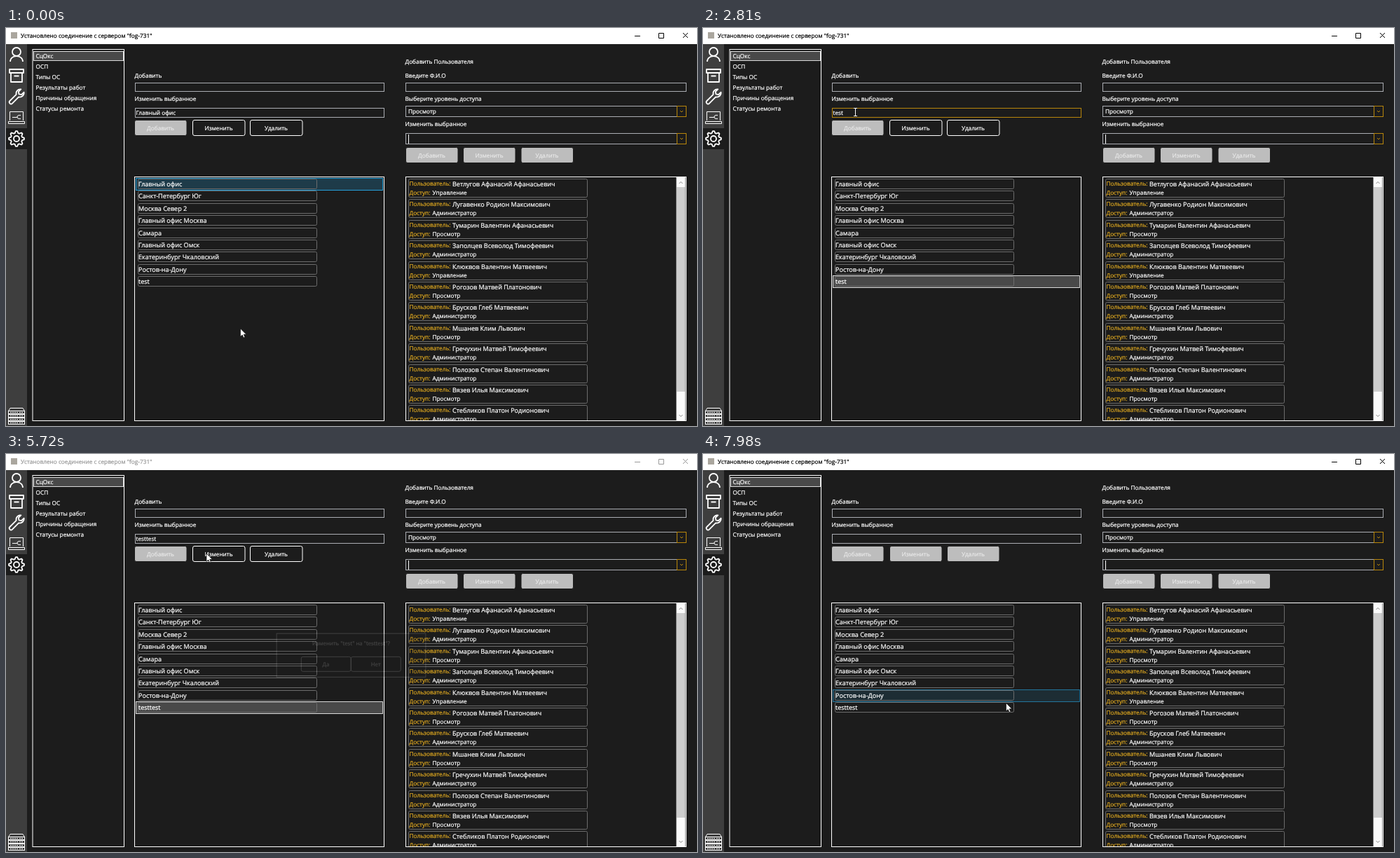
Write an HTML page that moves like this. It is 986 by 568 pixels and loops after 8 s.

```html
<!DOCTYPE html>
<html lang="ru">
<head>
<meta charset="utf-8">
<title>Справочники</title>
<style>
html, body { margin: 0; width: 100%; height: 100%; overflow: hidden; background: #1c1c1c; }
svg { display: block; color: #fff; }
text { font: 8.25px "Open Sans", "Noto Sans", sans-serif; fill: currentColor; stroke: currentColor; stroke-width: .22px;
  text-rendering: geometricPrecision; white-space: pre; }
text.big { font-size: 9.05px; }
text.mid { text-anchor: middle; }
text.gold { color: #daa520; }
.line { fill: none; stroke: #fff; }
.icon { fill: none; stroke: #fff; stroke-width: 1.8; stroke-linejoin: round; }
.box { fill: none; stroke: #abadb3; }
.card { fill: none; stroke: #6c6c6c; }
.accent { fill: none; stroke: #b8860b; }
.row { fill: none; stroke: none; }
.row.sel { fill: #26a0da3d; stroke: #26a0da; }
.row.hover { fill: #26a0da1f; stroke: #26a0daa8; }
.row.idle { fill: #dadada3d; stroke: #dadada; }
.on rect { fill: #b8860b; stroke: #fff; }
.off rect { fill: #bdbdbd; stroke: #1c1c1c; }
.off text { color: #e8e8e8; }
</style>
</head>
<body>
<script>
const rect = (x, y, w, h, attrs = '') => `<rect x="${x}" y="${y}" width="${w}" height="${h}" ${attrs}/>`;
const path = (d, attrs = 'class="icon"') => `<path d="${d}" ${attrs}/>`;
// y is the middle of the capitals
const text = (x, y, s, cls = '', id = '') => `<text x="${x}" y="${y + 3}" class="${cls}" id="${id}">${s}</text>`;
const button = (x, y, s, state, id = '') =>
  `<g class="${state}" id="${id}">${rect(x, y, 74.5, 22, 'rx="2.5"')}${text(x + 37, y + 11.5, s, 'mid')}</g>`;
const combo = (y, h) => rect(570.5, y, 400, h, 'class="box"') +
  rect(957.5, y, 13, h, 'class="accent"') + path(`M962 ${y + h / 2 - 1}l2 2l2 -2`, 'class="accent"');

const menu = ['СцОкс', 'ОСП', 'Типы ОС', 'Результаты работ', 'Причины обращения', 'Статусы ремонта'];
const offices = ['Главный офис', 'Санкт-Петербург Юг', 'Москва Север 2', 'Главный офис Москва', 'Самара',
  'Главный офис Омск', 'Екатеринбург Чкаловский', 'Ростов-на-Дону', 'test'];
const roles = { a: 'Администратор', e: 'Управление', v: 'Просмотр' };
const users = [
  ['Ветлугов Афанасий Афанасьевич', 'e'], ['Лугавенко Родион Максимович', 'a'],
  ['Тумарин Валентин Афанасьевич', 'v'], ['Заполцев Всеволод Тимофеевич', 'a'],
  ['Клюквов Валентин Матвеевич', 'e'], ['Рогозов Матвей Платонович', 'v'],
  ['Брусков Глеб Матвеевич', 'a'], ['Мшанев Клим Львович', 'v'],
  ['Гречухин Матвей Тимофеевич', 'a'], ['Полозов Степан Валентинович', 'a'],
  ['Вязев Илья Максимович', 'v'], ['Стебликов Платон Родионович', 'a']];
const ROW = 17.45, TOP = 213.7;

function titleBar() {
  return rect(0, 0, 986, 23, 'fill="#fff"') + rect(7, 6, 9, 9, 'fill="#aaa69e"') +
    '<g id="title">' + text(21, 11, 'Установлено соединение с сервером "fog-731"') +
    path('M897 11.5h8M931.5 7.5h7v7h-7zM966 7l7 7M973 7l-7 7', 'fill="none" stroke="currentColor"') + '</g>';
}

function sideBar() {
  const gear = Array.from({ length: 32 }, (_, i) => {
    const r = i % 4 < 2 ? 11 : 8.3, a = (i - 0.5) * Math.PI / 16;
    return [15 + r * Math.cos(a), 158 + r * Math.sin(a)].map(v => v.toFixed(1));
  }).join('L');
  let s = rect(0, 23, 30, 545, 'fill="#3e3e3e"') + rect(0, 143, 30, 30, 'fill="#1c1c1c"');
  s += path('M15 28a6 6 0 0 1 0 12a6 6 0 0 1 0 -12M6 48C6 37.5 24 37.5 24 48');
  s += path('M5 59h20v5H5zM7 64v13h16V64M11.5 68.5h7');
  s += '<g transform="translate(15 98) rotate(45)">' +
    path('M-2.5 -2V11a2.5 2.5 0 0 0 5 0V-2A6 6 0 0 0 3 -12V-7L0 -5L-3 -7V-12A6 6 0 0 0 -2.5 -2Z') + '</g>';
  s += path('M5.5 132V119.5h19V132M3.5 133.5h23v3h-23zM9 127.5h7M21 124.5h-3l-2 1.5v2l2 1.5h3', 'class="line"');
  s += path(`M${gear}Z`) + '<circle cx="15" cy="158" r="4" class="icon"/>';
  s += path('M3.5 546.5L6 542.5H24L26.5 546.5', 'class="line"');
  for (let y = 546.5; y < 565; y += 5)
    s += rect(3.5, y, 23, 4, 'class="line"') + path(`M6 ${y + 2}h11M19 ${y + 2}h5`, 'class="line" stroke-dasharray="2 1"');
  return s;
}

function officePanel() {
  let s = text(183.5, 68, 'Добавить') + rect(184.5, 78.5, 355, 12, 'class="box"') +
    text(183.5, 101, 'Изменить выбранное') + rect(184.5, 114.5, 355, 13, 'id="field"') +
    text(185.5, 121, '', '', 'value') + rect(0, 115, 1, 12, 'id="caret" fill="#fff"') +
    button(183.5, 131.5, 'Добавить', 'off') + button(266.5, 131.5, 'Изменить', 'on', 'change') +
    button(348.5, 131.5, 'Удалить', 'on', 'remove') + rect(183.5, 212.5, 356, 348, 'class="line"');
  offices.forEach((name, i) => {
    const y = Math.round(TOP + i * ROW);
    s += rect(185.5, y + 0.5, 352, 17, `class="row" id="row${i}"`) +
      rect(188.5, y + 1.5, 255, 14, 'rx="2" class="card"') + text(189, y + 9, name, 'big', 'name' + i);
  });
  return s;
}

function userPanel() {
  let s = text(569.5, 48, 'Добавить Пользователя') + text(569.5, 68, 'Введите Ф.И.О') +
    rect(570.5, 78.5, 400, 12, 'class="box"') + text(569.5, 101, 'Выберите уровень доступа') +
    combo(111.5, 15) + text(574, 119, 'Просмотр') + text(569.5, 137, 'Изменить выбранное') +
    combo(150.5, 15) + path('M574.5 152v13', 'class="line"');
  [[570.5, 'Добавить'], [652.5, 'Изменить'], [735, 'Удалить']].forEach(([x, name]) => s += button(x, 170.5, name, 'off'));
  s += '<svg y="213" width="986" height="347" viewBox="0 213 986 347">';
  users.forEach(([name, role], i) => {
    const y = Math.round(215 + i * 29.4);
    s += rect(574.5, y + 0.5, 255, 26, 'rx="2" class="card"') +
      text(575.5, y + 7, 'Пользователь:', 'gold') + text(637, y + 8, name, 'big') +
      text(575.5, y + 20, 'Доступ:', 'gold') + text(608.5, y + 20, roles[role]);
  });
  return s + '</svg>' + rect(956.5, 213, 13, 347, 'fill="#fafafa"') + rect(957, 227, 12, 292, 'fill="#cdcdcd"') +
    path('M960.5 222l2.5 -2.5l2.5 2.5M960.5 552l2.5 2.5l2.5 -2.5', 'fill="none" stroke="#888"') +
    rect(570.5, 212.5, 400, 348, 'class="line"');
}

const menuPanel = () => rect(38, 30.5, 130.5, 530, 'class="line"') +
  rect(39.5, 33.5, 128, 13, 'class="row idle"') + menu.map((s, i) => text(42.5, 40 + 15 * i, s)).join('');

const dialogBox = () => '<g id="dialog">' + rect(380.5, 254.5, 224, 65.5, 'fill="#1c1c1c" stroke="#fff"') +
  text(492.5, 269, 'Изменить "test" на "testtest"?', 'mid') +
  button(417.5, 289.5, 'Да', 'on', 'yes') + button(492.5, 289.5, 'Нет', 'on', 'no') + '</g>';

document.body.innerHTML = '<svg width="986" height="568">' + rect(0, 0, 986, 568, 'fill="#1c1c1c"') +
  titleBar() + sideBar() + menuPanel() + officePanel() + userPanel() + dialogBox() +
  path('M0 0V11.5L2.7 9L4.5 13L6.4 12.2L4.7 8.3H8.3Z', 'id="arrow" fill="#fff" stroke="#000" stroke-width=".6"') +
  path('M-2.5 -5.5h5M0 -5.5v11M-2.5 5.5h5', 'id="beam" class="line"') + '</svg>';
const $ = id => document.getElementById(id);

// time, x, y of the pointer
const track = [[250, 334.5, 429], [660, 274.5, 363], [1430, 274.5, 363], [1540, 252, 257], [1570, 245, 178],
  [1660, 225, 140], [1880, 217, 120], [4700, 217, 120], [4970, 279, 139.5], [5090, 286, 143], [5220, 286, 142],
  [6200, 286, 142], [6580, 431, 248], [7000, 453, 295], [7030, 456, 301], [7780, 456, 301], [7980, 432.5, 355.5]];
const ramp = (t, a, b) => Math.min(1, Math.max(0, (t - a) / (b - a)));
const within = (t, ...spans) => spans.some(([a, b]) => t >= a && t < b);

function pointer(t) {
  const i = track.findIndex(k => k[0] > t);
  if (i < 1) return track.at(i).slice(1);
  const [a, b] = [track[i - 1], track[i]], k = ramp(t, a[0], b[0]);
  return [a[1] + (b[1] - a[1]) * k, a[2] + (b[2] - a[2]) * k];
}

function setButton(id, on, glow = 0) {
  const g = $(id), face = g.firstChild.style;
  g.setAttribute('class', on ? 'on' : 'off');
  face.fillOpacity = on ? glow : 1;
  face.strokeOpacity = on ? 1 - glow : 1;
}

function draw(t) {
  const [x, y] = pointer(t), done = t >= 7380, modal = t >= 5690 && !done;
  const inField = x > 184 && x < 540 && y > 114 && y < 128;

  $('title').style.color = modal ? '#999' : '#000';
  $('field').setAttribute('class', t < 5690 && (inField || t >= 2250) ? 'accent' : 'box');
  const typed = t < 3900 ? 0 : Math.min(4, 1 + Math.floor((t - 3900) / 60));
  $('value').textContent = done ? '' : t < 1030 ? offices[0] : 'test' + 'test'.slice(0, typed);
  const caretOn = within(t, [2250, 2810], [3300, 3610], [3900, 4700], [5220, 5690]);
  $('caret').style.display = caretOn ? '' : 'none';
  if (caretOn) $('caret').setAttribute('x', Math.round(185.3 + $('value').getComputedTextLength()));
  setButton('change', !done, t < 5690 ? ramp(t, 4970, 5160) : 0);
  setButton('remove', !done);

  // the row highlight trails the pointer slightly
  const [hx, hy] = pointer(t - 30), live = within(t, [1430, 1900], [7440, 8000]);
  const hover = live && hx > 185 && hx < 538 ? Math.floor((hy - TOP) / ROW) : -1;
  const selected = t < 1030 ? 0 : done ? -1 : 8;
  offices.forEach((_, i) => $('row' + i).setAttribute('class',
    'row ' + (i === selected ? (t < 2250 ? 'sel' : 'idle') : i === hover ? 'hover' : '')));
  $('name8').textContent = t < 5720 ? 'test' : 'testtest';

  const shown = ramp(t, 5690, 5880) * (1 - ramp(t, 7350, 7440)), size = 0.94 + 0.06 * shown;
  $('dialog').setAttribute('opacity', shown);
  $('dialog').setAttribute('transform', `translate(492.5 287.5) scale(${size}) translate(-492.5 -287.5)`);
  setButton('yes', true, ramp(t, 7030, 7200));
  setButton('no', true);

  const hidden = within(t, [3610, 4700]);
  $('arrow').style.display = hidden || inField ? 'none' : '';
  $('beam').style.display = !hidden && inField ? '' : 'none';
  $('arrow').setAttribute('transform', `translate(${x} ${y})`);
  $('beam').setAttribute('transform', `translate(${Math.floor(x) + 0.5} ${Math.floor(y)})`);
}

function loop() {
  draw(performance.now() % 8000);
  requestAnimationFrame(loop);
}
loop();
</script>
</body>
</html>
```
